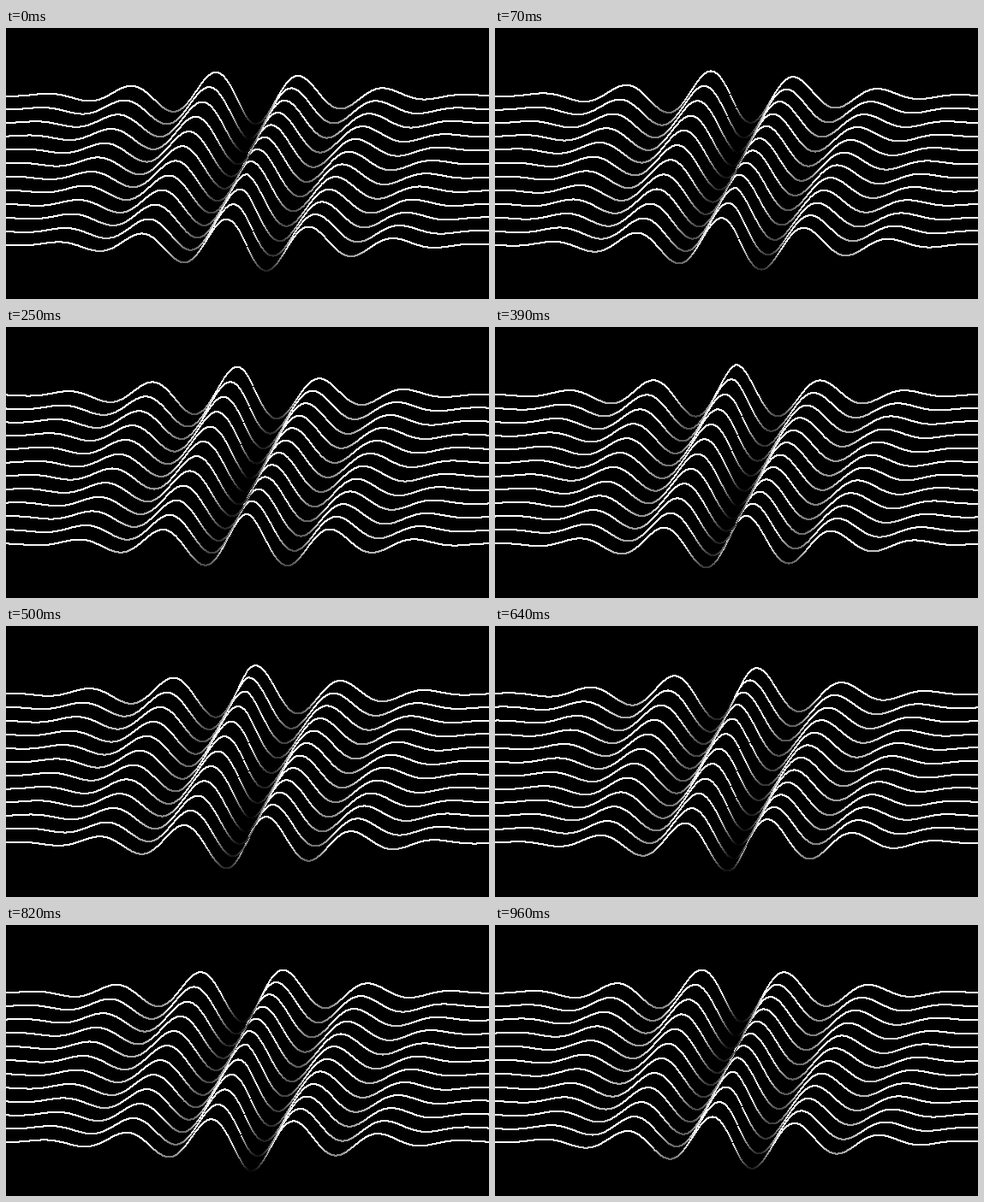
Animation, 564 px wide and 317 px high, one loop 990 ms. Source, as an HTML page with a canvas:

```html
<!DOCTYPE html>
<html lang="en">
<head>
<meta charset="utf-8">
<title>Travelling waves</title>
<style>
  html, body { margin: 0; width: 100%; height: 100%; overflow: hidden; background: #000; }
  canvas { display: block; }
</style>
</head>
<body>
<canvas id="stage" width="564" height="317"></canvas>
<script>
const W = 564, H = 317;
const LOOP = 990, STEPS = 28, STEP_MS = 1000 / STEPS;
const LINES = 12, GAP = H / 20, TOP = H / 4, DOT = 2;
const AMPLITUDE = 35.2, WAVELENGTH = 99.7, REACH = 320;
const START_CREST = 243.3, LINE_PHASE = 0.5;
const ctx = document.getElementById('stage').getContext('2d');

// The motion advances in equal steps, timed to whole hundredths of a second.
function progress(ms) {
  const tick = Math.floor((ms % LOOP) / 10) * 10;
  return Math.floor((tick + 5) / STEP_MS) / STEPS;
}

function height(x, phase) {
  const envelope = (1 - Math.abs(x - W / 2) / REACH) ** 2;
  return AMPLITUDE * envelope * Math.cos(2 * Math.PI * (x - START_CREST) / WAVELENGTH + phase);
}

// White at rest and above, fading to black at the deepest point.
function shade(h) {
  const v = Math.round(255 * Math.min(1, Math.max(0, 1 + h / AMPLITUDE)));
  return `rgb(${v},${v},${v})`;
}

function draw(now) {
  const shift = 2 * Math.PI * progress(now);
  ctx.fillStyle = '#000';
  ctx.fillRect(0, 0, W, H);
  // Hard-edged dots, lowest line first so that upper troughs cover lower crests.
  for (let i = LINES - 1; i >= 0; i--) {
    for (let x = 0; x <= W; x++) {
      const h = height(x, i * LINE_PHASE - shift);
      ctx.fillStyle = shade(h);
      ctx.fillRect(x - DOT / 2, Math.round(TOP + i * GAP - h) - DOT / 2, DOT, DOT);
    }
  }
}

function loop() {
  draw(performance.now());
  requestAnimationFrame(loop);
}
loop();
</script>
</body>
</html>
```
